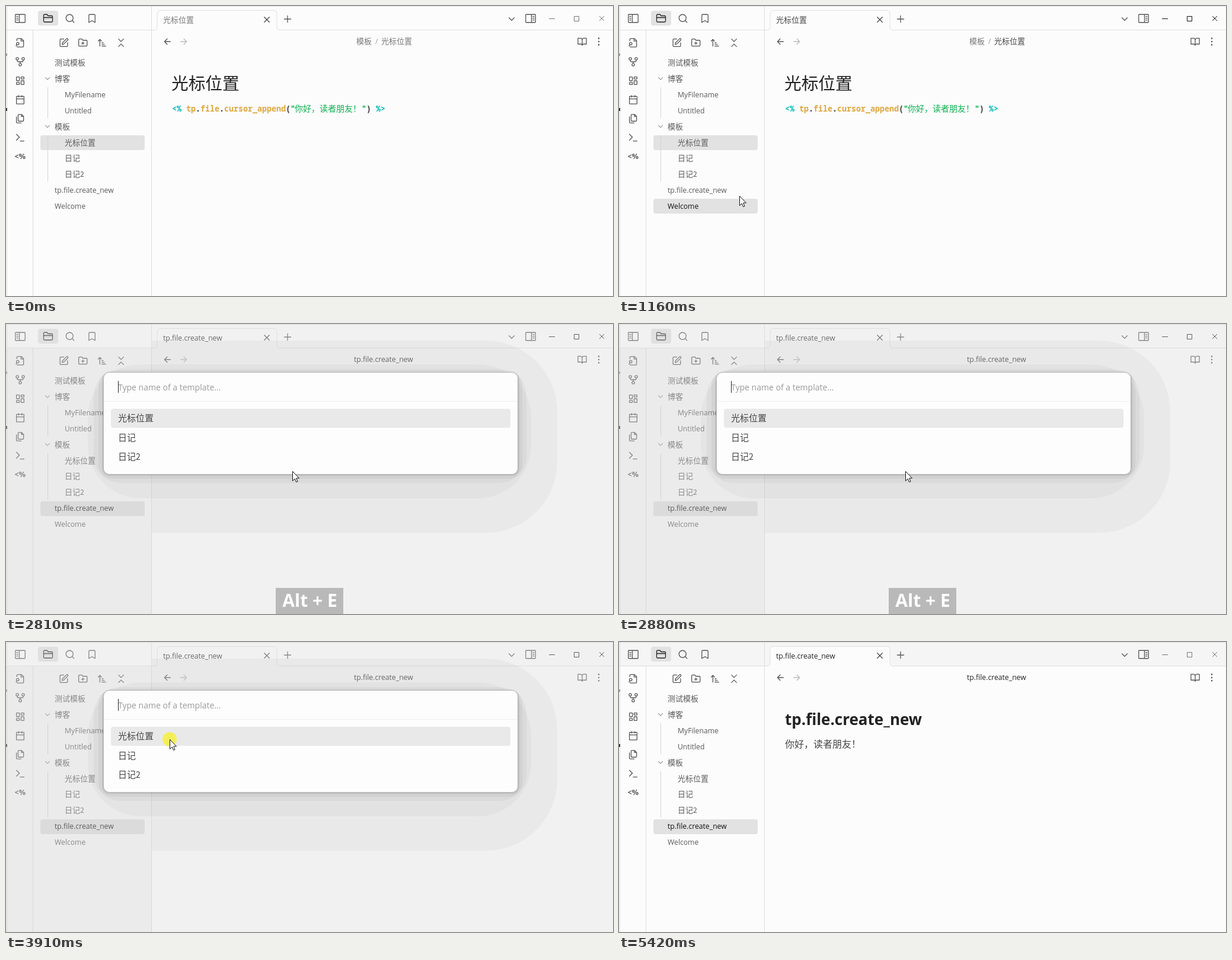
Recreate the animation shown at these times as an HTML page. Size 1024x489 px, loop 5.49 s.

```html
<!DOCTYPE html>
<html lang="zh-CN">
<head>
<meta charset="utf-8">
<style>
html, body { margin: 0; width: 100%; height: 100%; overflow: hidden; background: #fcfcfc; }
svg { display: block; width: 1024px; height: 489px; }
text { font-family: "Open Sans", "Noto Sans CJK SC", "Noto Sans CJK", sans-serif; font-size: 12.2px; fill: #5a5a5a; white-space: pre; }
.cjk { font-family: "Noto Sans CJK SC", "Noto Sans CJK", sans-serif; font-size: 13px; font-weight: 300; }
.option { font-size: 15px; fill: #444; }
.code text { font: 600 13.33px "Noto Sans Mono", "Noto Sans CJK SC", "Noto Sans CJK", monospace; }
.icon { fill: none; stroke-linecap: round; stroke-linejoin: round; }
</style>
</head>
<body>
<svg id="stage" viewBox="0 0 1024 489" xmlns="http://www.w3.org/2000/svg"></svg>
<script>
const LOOP = 5490, TICK = LOOP / 80;
const FILE = 'tp.file.create_new', NOTE = '光标位置', GREETING = '你好，读者朋友！';
const stage = document.getElementById('stage');

const circle = (x, y, r) => `M${x - r} ${y}a${r} ${r} 0 1 0 ${2 * r} 0a${r} ${r} 0 1 0 ${-2 * r} 0`;
const box = (x, y, w, h) => `M${x + 1} ${y}h${w - 2}q1 0 1 1v${h - 2}q0 1-1 1h${2 - w}q-1 0-1-1v${2 - h}q0-1 1-1z`;
const folder = 'M4 20h16a2 2 0 0 0 2-2V8a2 2 0 0 0-2-2h-8l-2.4-3H4a2 2 0 0 0-2 2v13a2 2 0 0 0 2 2Z';

const ICONS = {
  panel: box(1, 3, 22, 18) + 'M10 3v18M4 7.5h3M4 11.5h3M4 15.5h3',
  folder: folder + 'M2 10h20',
  search: circle(11, 11, 8) + 'M21 21l-4.3-4.3',
  bookmark: 'm19 21-7-4-7 4V5a2 2 0 0 1 2-2h10a2 2 0 0 1 2 2z',
  fileSearch: 'M14 2v6h6M4.3 21A2 2 0 0 0 6 22h12a2 2 0 0 0 2-2V7l-5-5H6a2 2 0 0 0-2 2v3' + circle(6, 14, 3) + 'M2 19.500l2-3',
  fork: circle(12, 19, 3) + circle(5, 5, 3) + circle(19, 5, 3) + 'M19 8v2q0 2-2 2H7q-2 0-2-2V8M12 12v4',
  dashboard: box(3, 3, 7, 9) + box(14, 3, 7, 5) + box(14, 12, 7, 9) + box(3, 16, 7, 5),
  calendar: box(3, 4, 18, 18) + 'M16 2v4M8 2v4M3 10h18',
  files: 'M15.5 2H8.6Q7 2 7 3.6v12.8Q7 18 8.6 18h9.8q1.6 0 1.6-1.6V6.5zM3 7.6v12.8Q3 22 4.6 22h9.8M15 2v5h5',
  terminal: 'm3 18 7-7-7-7M12 20h9',
  edit: 'M12 3H5a2 2 0 0 0-2 2v14a2 2 0 0 0 2 2h14a2 2 0 0 0 2-2v-7M18.4 2.6a2.1 2.1 0 0 1 3 3L12 15l-4 1 1-4Z',
  folderPlus: folder + 'M12 10v6M9 13h6',
  sort: 'm3 8 4-4 4 4M7 4v16M12 12h3M12 16h6M12 20h9',
  collapse: 'm6 21 6-6 6 6M6 3l6 6 6-6',
  back: 'm12 19-7-7 7-7M20 12H5',
  forward: 'm12 5 7 7-7 7M4 12h15',
  book: 'M2 4h6a4 4 0 0 1 4 4v13a3 3 0 0 0-3-3H2zM22 4h-6a4 4 0 0 0-4 4v13a3 3 0 0 1 3-3h7z',
  dots: circle(12, 4, 1) + circle(12, 12, 1) + circle(12, 20, 1),
  close: 'M18 6 6 18M6 6l12 12',
  plus: 'M5 12h14M12 5v14',
  chevron: 'm6 9 6 6 6-6'
};

const icon = (name, x, y, size = 18, color = '#555', flip = 1) =>
  `<path class="icon" d="${ICONS[name]}" stroke="${color}" stroke-width="${1.3 * 24 / size}"
    transform="translate(${x} ${y}) scale(${flip * size / 24} ${size / 24}) translate(-12 -12)"/>`;
const rect = (x, y, w, h, fill, extra = '') =>
  `<rect x="${x}" y="${y}" width="${w}" height="${h}" fill="${fill}" ${extra}/>`;
const text = (x, y, value, extra = '') => `<text x="${x}" y="${y}" ${extra}>${value}</text>`;
const cjk = (x, y, value, extra = '') => text(x, y, value, `class="cjk" ${extra}`);
const option = (y, value) => text(189, y, value, 'class="cjk option"');

const rows = [
  { label: '测试模板', x: 82 }, { label: '博客', x: 82, folder: true },
  { label: 'MyFilename', x: 99 }, { label: 'Untitled', x: 99 },
  { label: '模板', x: 82, folder: true },
  { label: NOTE, x: 99, id: 'note' }, { label: '日记', x: 99 }, { label: '日记2', x: 99 },
  { label: FILE, x: 82, id: 'file' }, { label: 'Welcome', x: 82, id: 'welcome' }
].map((row, i) => ({ ...row, y: 95.5 + i * 26.9 }));

const rowHighlights = rows.filter(r => r.id).map(r =>
  rect(58, Math.round(r.y - 12.2), 176, 25, '#e2e2e2', `rx="4" id="${r.id}Row"`)).join('');
const rowLabels = rows.map(r =>
  (r.folder ? icon('chevron', 70, r.y, 14, '#999') : '') +
  (/^[\x20-\x7e]+$/.test(r.label) ? text : cjk)(r.x, Math.round(r.y + 4.5),
    r.label.replace('2', '<tspan font-size="12.2">2</tspan>'), r.id ? `id="${r.id}Label"` : '')).join('');

const ribbon = ['fileSearch', 'fork', 'dashboard', 'calendar', 'files', 'terminal']
  .map((name, i) => icon(name, 24, 62 + i * 32, 17)).join('');
const tools = ['edit', 'folderPlus', 'sort', 'collapse']
  .map((name, i) => icon(name, 97.5 + i * 32.2, 62, 17)).join('');

const codeParts = [
  [280, '&lt;%', '#00b8b8'], [304, 'tp', '#dfa63c'], [320, '.', '#333'], [328, 'file', '#dfa63c'],
  [360, '.', '#333'], [368, 'cursor_append', '#dfa63c'], [472, '(', '#333'], [480, '"', '#08b04e'],
  [600, '"', '#08b04e'], [608, ')', '#333'], [624, '%&gt;', '#00b8b8']
].map(([x, value, color]) => text(x, 178, value, `style="fill:${color}"`)).join('') +
  cjk(487, 178, GREETING, 'style="font-size:14px;font-weight:400;fill:#08b04e"');

// Stepped shadow around the dialog: left, top, right, bottom, radius, opacity
const shadow = [
  [98, 28, 930, 352, 120, .033], [138, 68, 886, 294, 90, .03], [148, 76, 878, 268, 45, .035],
  [156, 79, 871, 261, 24, .045], [162, 81, 866, 256, 13, .09]
].map(([x, y, right, bottom, r, o], i) =>
  rect(x, y, right - x, bottom - y, '#000', `rx="${r}" opacity="${o}" ${i ? '' : 'clip-path="url(#editor)"'}`)).join('');

stage.innerHTML = `
  <clipPath id="editor">${rect(246, 0, 778, 489, '#000')}</clipPath>
  ${rect(0, 0, 1024, 489, '#fcfcfc')}
  ${rect(0, 0, 1024, 40, '#f5f5f5', 'id="titleBar"')}
  <path d="M246 40.5h4q5 0 5-5V14q0-6.500 6-6.500h190q6 0 6 6.500v21.500q0 5 5 5h562" fill="#fcfcfc" stroke="#e0e0e0"/>
  <path d="M0 .5H1024M1.500 0V489M0 40.5H246M45.500 41V489M245.500 0V489" fill="none" stroke="#dedede"/>
  ${rect(0, 172, 2, 5, '#333')}${rect(0, 80, 2, 4, '#999')}
  ${rect(54, 8, 34, 25, '#e2e2e2', 'rx="4"')}
  ${icon('panel', 24, 21, 18)}${icon('folder', 71, 21, 18, '#222')}
  ${icon('search', 108, 21)}${icon('bookmark', 145, 21)}
  ${ribbon}${text(14.5, 258, '&lt;%', 'font-weight="700" style="font-size:12.5px"')}${tools}
  ${rowHighlights}
  <path d="M70.500 137V189M70.500 218V296" stroke="#d4d4d4"/>
  ${rowLabels}
  ${icon('close', 440, 23, 17, '#444')}${icon('plus', 475, 22, 19)}
  ${icon('chevron', 853, 22, 18)}${icon('panel', 885, 21, 18, '#555', -1)}
  <path id="controls" d="M916 21.500h10M958.500 17.500h8v8h-8zM1001 17l8 8M1009 17l-8 8" fill="none"/>
  ${icon('back', 272, 60, 16)}${icon('forward', 300, 60, 16, '#bbb')}
  ${icon('book', 972, 60, 17)}${icon('dots', 1000, 60, 16)}
  <g id="notePage">
    ${cjk(265, 28, NOTE, 'id="noteTab"')}
    ${cjk(591, 64, '模板', 'style="fill:#777"')}${text(623, 64, '/', 'style="fill:#999"')}${cjk(633, 64, NOTE, 'id="noteCrumb"')}
    ${cjk(279, 141, NOTE, 'style="font-size:28.700px;font-weight:500;fill:#222"')}
    <g class="code">${codeParts}</g>
  </g>
  <g id="filePage">
    ${text(265, 28, FILE, 'style="fill:#222"')}${text(587, 64, FILE, 'style="fill:#222"')}
    ${text(280, 140, FILE, 'style="font-size:26px;font-weight:700;fill:#222"')}
    ${cjk(280, 178, GREETING, 'id="greeting" style="font-size:16px;fill:#444"')}
  </g>
  ${rect(0, 0, 1, 21, '#222', 'id="caret"')}
  <g id="modal">
    ${rect(0, 0, 1024, 489, '#dcdcdc', 'opacity=".38"')}
    ${rect(0, 41, 246, 448, '#000', 'opacity=".025"')}
    ${shadow}
    ${rect(164.5, 81.5, 699, 172, '#fdfdfd', 'rx="10" stroke="#b4b4b4"')}
    ${rect(165, 130, 698, 1, '#f0f0f0')}
    ${text(189, 112, 'Type name of a template...', 'style="font-size:14px;fill:#9a9a9a"')}
    ${rect(177, 143, 674, 32, '#e9e9e9', 'rx="4" id="choice"')}
    ${option(164, NOTE)}${option(197, '日记')}${option(229, '日记<tspan font-size="14">2</tspan>')}
    ${rect(189, 96, 1, 20, '#222', 'id="inputCaret"')}
  </g>
  <g id="badge">
    ${rect(455, 445, 114, 44, '#b9b9b9')}
    ${text(512.5, 477, 'Alt + E', 'text-anchor="middle" style="font-size:30px;font-weight:700;fill:#fff"')}
  </g>
  <circle id="click" r="12" fill="#f4ef58"/>
  <path id="arrow" d="M.5.5V16.500L4.200 13 6.600 18.500 9 17.500 6.700 12H11.500Z" fill="#fff" stroke="#111"/>
  <path id="beam" d="M-3-7.500h2.500l.5.5.5-.5H3M0-7V7M-3 7.500h2.500l.5-.5.5.5H3" fill="none" stroke="#111"/>`;

const el = Object.fromEntries([...stage.querySelectorAll('[id]')].map(node => [node.id, node]));
const show = (node, on) => node.setAttribute('visibility', on ? 'visible' : 'hidden');
const move = (node, x, y) => node.setAttribute('transform', `translate(${x} ${y})`);
const within = (t, ...spans) => spans.some(([from, to]) => t >= from && t < to);

// Pointer path: time, x, y
const path = [
  [70, 595, 340], [200, 508, 245], [340, 508, 245], [480, 460, 225], [610, 340, 245], [680, 317, 163],
  [820, 230, 290], [890, 137, 344], [955, 102, 347], [1090, 200, 336], [1160, 203, 320], [1500, 222, 300],
  [1860, 222, 300], [2200, 483, 248], [3010, 483, 248], [3290, 375, 205], [3500, 285, 168],
  [3640, 276, 164], [4110, 276, 164], [4450, 430, 189], [4530, 430, 189], [4790, 540, 400], [4940, 596, 490]
];

function pointerAt(t) {
  const time = Math.floor((t + 6) / TICK) * TICK;
  const next = path.findIndex(key => key[0] > time);
  if (next < 1) return path[next < 0 ? path.length - 1 : 0].slice(1);
  const [t0, x0, y0] = path[next - 1], [t1, x1, y1] = path[next];
  const k = (time - t0) / (t1 - t0);
  return [Math.round(x0 + (x1 - x0) * k), Math.round(y0 + (y1 - y0) * k)];
}

function render(t) {
  const [x, y] = pointerAt(t);
  const focused = within(t, [200, 5415]);
  const opened = t >= 1785;
  const modal = within(t, [2805, 4045]);
  const visible = within(t, [70, 4935]);
  const arrow = x < 246 || modal;

  show(el.titleBar, t >= 5415);
  el.controls.setAttribute('stroke', focused ? '#111' : '#777');
  el.noteTab.style.fill = el.noteCrumb.style.fill = focused ? '#444' : '#777';
  show(el.notePage, !opened);
  show(el.filePage, opened);
  show(el.greeting, t >= 4115);

  const lit = {
    note: !opened,
    file: t >= 1225,
    welcome: within(t, [885, 1225])
  };
  for (const id in lit) {
    show(el[id + 'Row'], lit[id]);
    el[id + 'Label'].style.fill = lit[id] && id !== 'note' ? '#111' : '#5a5a5a';
  }

  const inCode = t < 1785;
  show(el.caret, within(t, [200, 800], [1400, 1785], [1785, 2405], [4445, 5095]));
  el.caret.setAttribute('height', inCode ? 17 : 21);
  move(el.caret, inCode ? 639 : t < 4115 ? 280 : 408, inCode ? 165 : 161);

  show(el.modal, modal);
  show(el.inputCaret, modal && !within(t, [3080, 3575]));
  const choice = t < 3080 || y > 240 ? 0 : Math.max(0, Math.floor((y - 143) / 32.3));
  move(el.choice, 0, choice * 32.3);

  show(el.badge, within(t, [2805, 3705]));
  el.badge.setAttribute('opacity', t < 3635 ? 1 : .5);

  show(el.click, within(t, [200, 340], [1715, 1785], [3905, 4045]));
  move(el.click, x, y);
  show(el.arrow, visible && arrow);
  show(el.beam, visible && !arrow);
  move(el.arrow, x, y);
  move(el.beam, x + .5, y);
}

function frame() {
  render(performance.now() % LOOP);
  requestAnimationFrame(frame);
}
frame();
</script>
</body>
</html>
```
